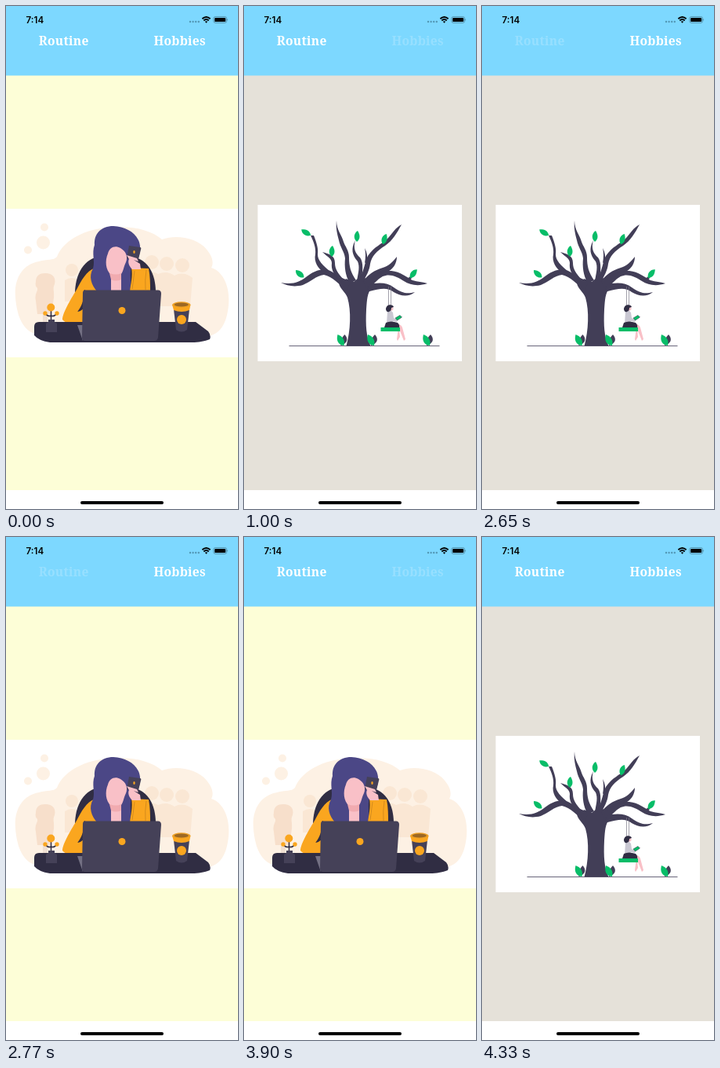
Write an HTML page that moves like this. It is 296x640 px and loops after 4.54 s.

```html
<!DOCTYPE html>
<html lang="en">
<head>
<meta charset="utf-8">
<title>Tabs</title>
<style>
html, body { margin: 0; width: 100%; height: 100%; overflow: hidden; background: #fff; }
svg { display: block; width: 296px; height: 640px; }
.tab { font: bold 15.6px "Noto Serif", serif; letter-spacing: .25px; fill: #fff; text-anchor: middle; }
.time { font: 600 11.6px Inter, sans-serif; }
.ink { fill: #454158; }
.dark { fill: #302d43; }
.gold { fill: #faa61f; }
.skin { fill: #f9c0c7; }
.hair { fill: #4b4786; }
.leaf { fill: #08bd68; }
.tree { fill: #423e57; }
</style>
</head>
<body>
<svg viewBox="0 0 296 640">
  <defs>
    <path id="leaf" d="M0 7C-5 3-4-4 1-7C4-2 5 3 0 7Z"/>
    <g id="shrub">
      <path class="tree" d="M-1 7C-2 0 1-4 4-7C8-3 9 4-1 7Z"/>
      <path class="leaf" d="M3 7C-5 6-7 0-5-7C1-5 5 0 3 7Z"/>
    </g>
  </defs>
  <rect width="296" height="640" fill="#fff"/>

  <g id="desk">
    <path fill="#fdfed7" d="M0 88H296V616H0Z"/>
    <path fill="#fff" d="M0 258H296V447H0Z"/>
    <g fill="#fdf1e4">
      <path d="M12 371C10 348 20 329 42 325C52 322 61 324 65 319C73 298 102 283 132 282C161 279 185 285 199 297C219 290 246 296 257 311C264 320 265 327 262 333C278 338 286 359 284 380C282 402 275 416 259 420L37 417C23 413 14 397 12 371Z"/>
      <circle cx="49" cy="281.500" r="5"/><circle cx="47.500" cy="301" r="8.500"/><circle cx="28" cy="310.500" r="5"/>
    </g>
    <g fill="#fae7d4">
      <circle cx="84" cy="336" r="8"/><path d="M75 349Q84 343 93 349V376H75Z"/>
      <circle cx="186" cy="326" r="9"/><circle cx="205" cy="328" r="9"/><circle cx="225" cy="330" r="9"/>
      <path d="M177 342Q186 336 194 341Q205 336 215 343Q226 337 238 346L235 382H178Z"/>
    </g>
    <path fill="#f7dfcb" d="M38 351C38 343 43 340 50 340C60 340 64 346 62 354C59 359 62 364 61 371L58 392H40L38 375C36 366 41 363 40 359C38 357 37 355 38 351Z"/>
    <path class="dark" d="M88 364C89 335 104 319 124 318L164 320C181 323 191 341 191 364Z"/>
    <path class="gold" d="M114 333C102 337 96 350 90 361C82 374 72 391 72 399C75 404 88 405 98 404L100 367H121Z"/>
    <path class="dark" d="M101 361C99 376 96 383 91 389Q96 388 99 385V362Z"/>
    <path class="hair" d="M137 280C121 280 112 290 113 304C109 315 114 324 111 334C105 344 109 355 116 363H158C161 351 157 342 160 332C170 325 174 309 169 298C163 286 151 281 137 280Z"/>
    <path class="skin" d="M130 315C132 307 139 304 146 308C153 312 156 319 153 326C150 332 150 337 147 341V363H134V342C127 336 126 324 130 315Z"/>
    <path fill="#f1abb0" d="M132 340Q141 343 147 340V348Q140 351 134 348Z"/>
    <path class="gold" d="M160 333L182 334C184 344 184 354 184 363H158C159 354 162 344 160 333Z"/>
    <path fill="none" stroke="#c4801c" stroke-width=".7" d="M164 337L161 360M179 336Q177 349 178 361"/>
    <path class="ink" d="M157 305L171 307Q173 307 172 310L168 326L154 321Z"/>
    <ellipse class="gold" cx="163.500" cy="313" rx="1.200" ry="2"/>
    <path class="skin" d="M154 317L167 321L169 325L163 323L171 328L172 335H161C157 331 155 326 157 322Z"/>
    <path class="dark" d="M36 408Q36 402 42 402H242L258 414Q262 419 260 424Q251 428 234 428H56Q42 426 36 419Z"/>
    <path fill="#737083" d="M91 406H98V426Z"/>
    <path class="ink" d="M101 361.500H194Q198 361.500 198 366L194 422Q193 426 189 426H101Q97 426 97 422L98 365Q98 361.500 101 361.500Z"/>
    <circle class="gold" cx="148" cy="387.500" r="4.500"/>
    <path fill="#efdfd2" d="M47 388H53V402H47Z"/>
    <path fill="none" stroke="#302d43" stroke-width="1.500" d="M57.500 386V403M50 391Q54 396 57.500 394Q61 396 65 391"/>
    <circle class="gold" cx="57.300" cy="383.500" r="5"/><circle class="gold" cx="50" cy="391" r="2.700"/><circle class="gold" cx="65" cy="391" r="2.700"/>
    <path class="ink" d="M54 399H62V402L65 404V415H51V404L54 402Z"/>
    <path class="ink" d="M214 386L217 412Q224 417 231 412L234 386Z"/>
    <path class="gold" d="M212 380H235.500L234 387Q224 391 214 387Z"/>
    <ellipse cx="223.800" cy="380" rx="11.700" ry="3.700" fill="#eda025"/>
    <ellipse cx="223.800" cy="380" rx="9" ry="2.500" fill="#9c6824"/>
    <circle class="gold" cx="224" cy="399" r="6"/>
  </g>

  <g id="garden">
    <path fill="#e5e1d9" d="M0 88H296V616H0Z"/>
    <path fill="#fff" d="M17.500 253H278V452H17.500Z"/>
    <path stroke="#423e57" stroke-width=".8" d="M57.500 432.500H249.500"/>
    <g class="tree">
      <path d="M130.500 432.500C136 413 137 388 132 371C129 363 123 361 121 353L127 354L130 347L140 351L145 347L154 346L162 351L163 359C157 365 157 374 156 386C155 407 156 421 161.500 432.500Z"/>
      <path d="M47 352C62 355 71 351 79 345C90 336 102 332 112 338C121 344 126 347 136 350L132 361C121 355 113 344 102 342C92 343 85 351 75 355C64 358 55 356 47 352Z"/>
      <path d="M85 292L89 292C93 302 95 309 94 316C94 324 101 330 109 337L103 340C94 334 89 325 91 316C92 308 89 300 85 292Z"/>
      <path d="M100 313C109 316 116 317 116 327C116 335 120 340 127 348L121 348C114 341 111 335 112 327C112 321 106 319 100 313Z"/>
      <path d="M118 273C118 285 125 292 127 300C129 306 134 311 134 320C134 331 136 339 143 349L135 353C129 342 128 332 129 321C128 312 123 308 121 298C119 290 117 283 118 273Z"/>
      <path d="M142 298C139 308 142 315 148 320C153 327 151 338 150 349L144 350C146 338 148 332 145 325C138 317 136 309 142 298Z"/>
      <path d="M201 278C195 289 190 298 180 305C169 312 163 318 161 328C160 337 156 343 152 351L147 347C154 336 154 325 158 318C166 306 176 303 183 296C189 290 193 282 201 278Z"/>
      <path d="M154 308Q158 315 157 325L154 327Q156 316 154 308Z"/>
      <path d="M195 319C195 328 190 335 182 339C172 343 166 350 156 359L152 350C159 341 167 336 177 333C185 331 190 325 195 319Z"/>
      <path d="M234 353C222 357 212 355 204 350C195 344 186 340 177 344C170 348 165 354 158 361L156 351C165 342 175 336 188 337C200 338 207 345 215 349C222 351 227 351 234 353Z"/>
      <path d="M205 347Q210 347 213 343L214.500 344.500Q213 349 209 350Z"/>
      <path d="M218 364C210 371 199 369 191 364C182 357 173 360 160 363L158 355C171 351 183 352 191 358C201 365 208 367 218 364Z"/>
    </g>
    <g class="leaf">
      <use href="#leaf" transform="translate(79 288.500) rotate(-62)"/>
      <use href="#leaf" transform="translate(112 312)"/>
      <use href="#leaf" transform="translate(144 293)"/>
      <use href="#leaf" transform="translate(179 296.500) rotate(15)"/>
      <use href="#leaf" transform="translate(216 340.500) rotate(35)"/>
      <use href="#leaf" transform="translate(71 341) rotate(-52)"/>
    </g>
    <use href="#shrub" x="124.500" y="425"/>
    <use href="#shrub" x="163" y="425"/>
    <use href="#shrub" x="234" y="425"/>
    <path stroke="#7c7988" stroke-width=".7" d="M184.500 357V410M187.500 357V410"/>
    <path class="skin" d="M193 404Q200 404 202 409L206 424L204 426L198 411L199 421L196 426L195 424L197 409H193Z"/>
    <path fill="#c9c7d2" d="M183 389Q187 386 190 390L191 397L196 399L195 402L190 401V404H182Z"/>
    <path class="dark" d="M181 403Q187 400 196 403Q199 406 198 409H179Z"/>
    <circle class="skin" cx="188" cy="385" r="2.500"/>
    <path class="dark" d="M181 386C181 379 190 379 191 383L188 384Q188 388 185 389Q182 390 181 386Z"/>
    <path class="leaf" stroke="#302d43" stroke-width=".5" d="M193 397L199 393.500L201.500 396L195.500 400Z"/>
    <path class="leaf" d="M174.500 409H199V414H174.500Z"/>
  </g>

  <path fill="#7dd8ff" d="M0 0H296V88.500H0Z"/>
  <text class="tab" id="routine" x="73.700" y="50">Routine</text>
  <text class="tab" id="hobbies" x="221.700" y="50">Hobbies</text>
  <text class="time" x="25.500" y="21.800">7:14</text>
  <path stroke="#5398b6" stroke-width="2.400" stroke-linecap="round" stroke-dasharray="0 3.600" d="M235 20H247"/>
  <path fill="none" stroke="#000" stroke-width="1.900" d="M250.400 16.300Q255.500 11.800 260.600 16.300M252.300 18.400Q255.500 15.700 258.700 18.400"/>
  <path d="M253.800 19.800Q255.500 18.500 257.200 19.800L255.500 21.700Z"/>
  <rect x="264.900" y="13.600" width="16.600" height="7.800" rx="2.200" fill="none" stroke="#4b8199" stroke-width=".8"/>
  <rect x="266.200" y="14.900" width="14" height="5.200" rx="1.200"/>
  <path fill="#4b8199" d="M282.400 16.200Q284 17.500 282.400 18.800Z"/>
  <rect x="95" y="630" width="106" height="4" rx="2"/>
</svg>
<script>
const loop = 4540;
const $ = id => document.getElementById(id);
// press: tab dims; swap: scene changes, then the tab brightens in steps
const taps = [
  { tab: 'hobbies', scene: 'garden', press: 900, swap: 1000, back: [1100, 1210, 1320] },
  { tab: 'routine', scene: 'desk', press: 2650, swap: 2770, back: [2890, 3000, 3110] },
  { tab: 'hobbies', scene: 'garden', press: 3900, swap: 4020, back: [4130, 4230, 4330] }
];
const ease = p => p < .5 ? 2 * p * p : 1 - 2 * (1 - p) ** 2;

function draw(t) {
  const alpha = { routine: 1, hobbies: 1 };
  let scene = 'desk';
  for (const { tab, scene: next, press, swap, back } of taps) {
    if (t < press) break;
    if (t >= swap) scene = next;
    const step = back.filter(b => t >= b).pop() ?? swap;
    alpha[tab] = .2 + .8 * ease(Math.min(1, (step - swap) / 250));
  }
  for (const tab in alpha) $(tab).style.opacity = alpha[tab];
  for (const id of ['desk', 'garden']) $(id).style.display = id === scene ? '' : 'none';
}

const start = performance.now();
function tick(now) {
  draw(Math.max(0, now - start) % loop);
  requestAnimationFrame(tick);
}
draw(0);
requestAnimationFrame(tick);
</script>
</body>
</html>
```
